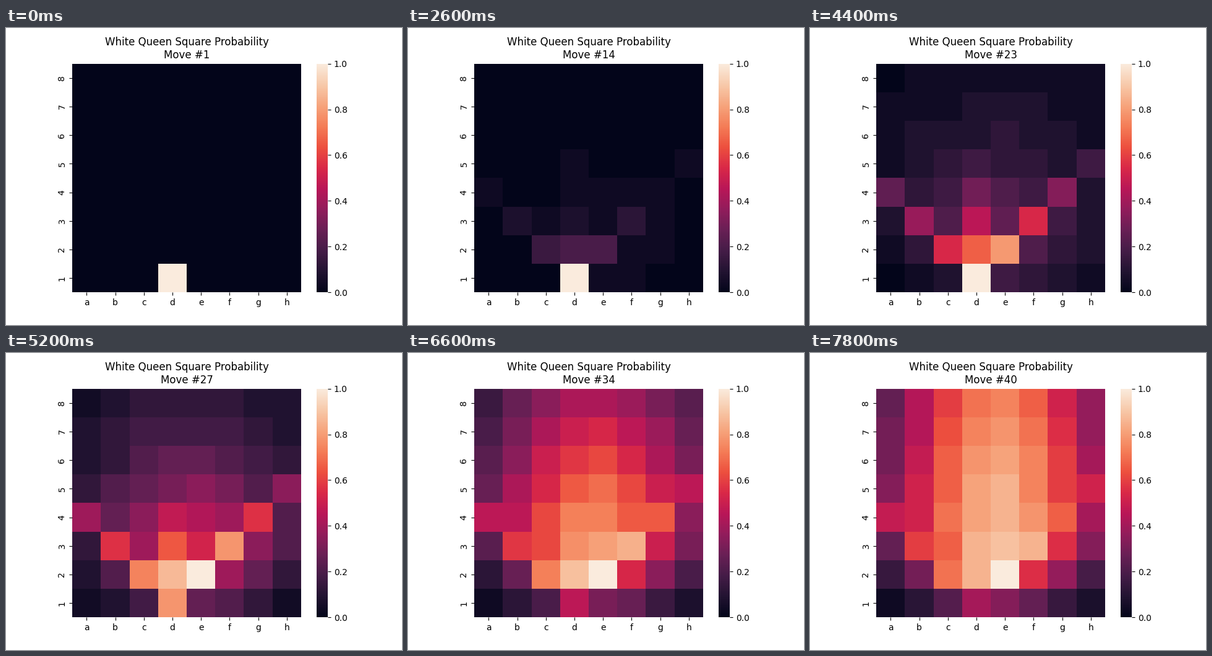
A matplotlib script for the animation above (8 s loop, 640 by 480 pixels).

```python
import numpy as np
import matplotlib.pyplot as plt
from matplotlib.animation import FuncAnimation
from matplotlib.colors import LinearSegmentedColormap

MOVES = 40
STEP_MS = 200
GAMES = 26
HOME_FILE = 3  # the d file

ROCKET = LinearSegmentedColormap.from_list("rocket", [
    "#03051a", "#221331", "#451c47", "#691f55", "#921c5b", "#b91657",
    "#d92847", "#ed503e", "#f47d57", "#f6a47c", "#f7c9aa", "#faebdd"])

# Row 0 of the grid is the eighth rank
rank, file = np.meshgrid(np.arange(8, 0, -1), np.arange(8), indexing="ij")


def rise(move, middle, width=4):
    """Smooth S-curve from 0 to 1."""
    return 1 / (1 + np.exp(-(move - middle) / width))


def spread(move):
    """Broad hill that reaches the far ranks later."""
    peak = np.minimum(0.36 * rank, 0.95)
    width = np.minimum(1.5 + 0.3 * rank, 2.7)
    bell = np.exp(-((file - 3.75) / width) ** 2 / 2)
    return peak * bell * rise(move, 23 + 1.45 * rank)


def lines(move):
    """Squares the queen sees from d1: left diagonal, file, right diagonal."""
    steps = rank - 1
    reach = np.maximum(1.1 - 0.15 * steps, 0) * rise(move, 17.5 + 2.2 * steps)
    offset = file - HOME_FILE
    side = np.select([offset == -steps, offset == 0, offset == steps],
                     [0.78, 0.95, 1.1])
    return side * reach


def probability(move):
    """Whole-game counts, scaled so the busiest square is 1."""
    share = np.maximum(spread(move), lines(move))
    share[-1, HOME_FILE] = 1 - 0.56 * rise(move, 26.5, 1.8)
    count = np.round(GAMES * share)
    return count / count.max()


plt.rcParams["font.family"] = "DejaVu Sans"
fig, ax = plt.subplots(figsize=(6.4, 4.8), dpi=100)
mesh = ax.pcolormesh(probability(1), cmap=ROCKET, vmin=0, vmax=1)
ax.set(xlim=(0, 8), ylim=(8, 0), aspect="equal")
ax.spines[:].set_visible(False)

bar = fig.colorbar(mesh, ax=ax)
bar.outline.set_linewidth(0)

centres = np.arange(8) + 0.5
ax.set_xticks(centres, list("abcdefgh"))
ax.set_yticks(centres, list("87654321"), rotation="vertical", va="center")
title = ax.set_title("")


def draw(frame):
    move = frame + 1
    mesh.set_array(probability(move))
    title.set_text(f"White Queen Square Probability\nMove #{move}")
    return mesh, title


anim = FuncAnimation(fig, draw, frames=MOVES, interval=STEP_MS,
                     init_func=lambda: draw(0), repeat=True, repeat_delay=0)
plt.show()
```
